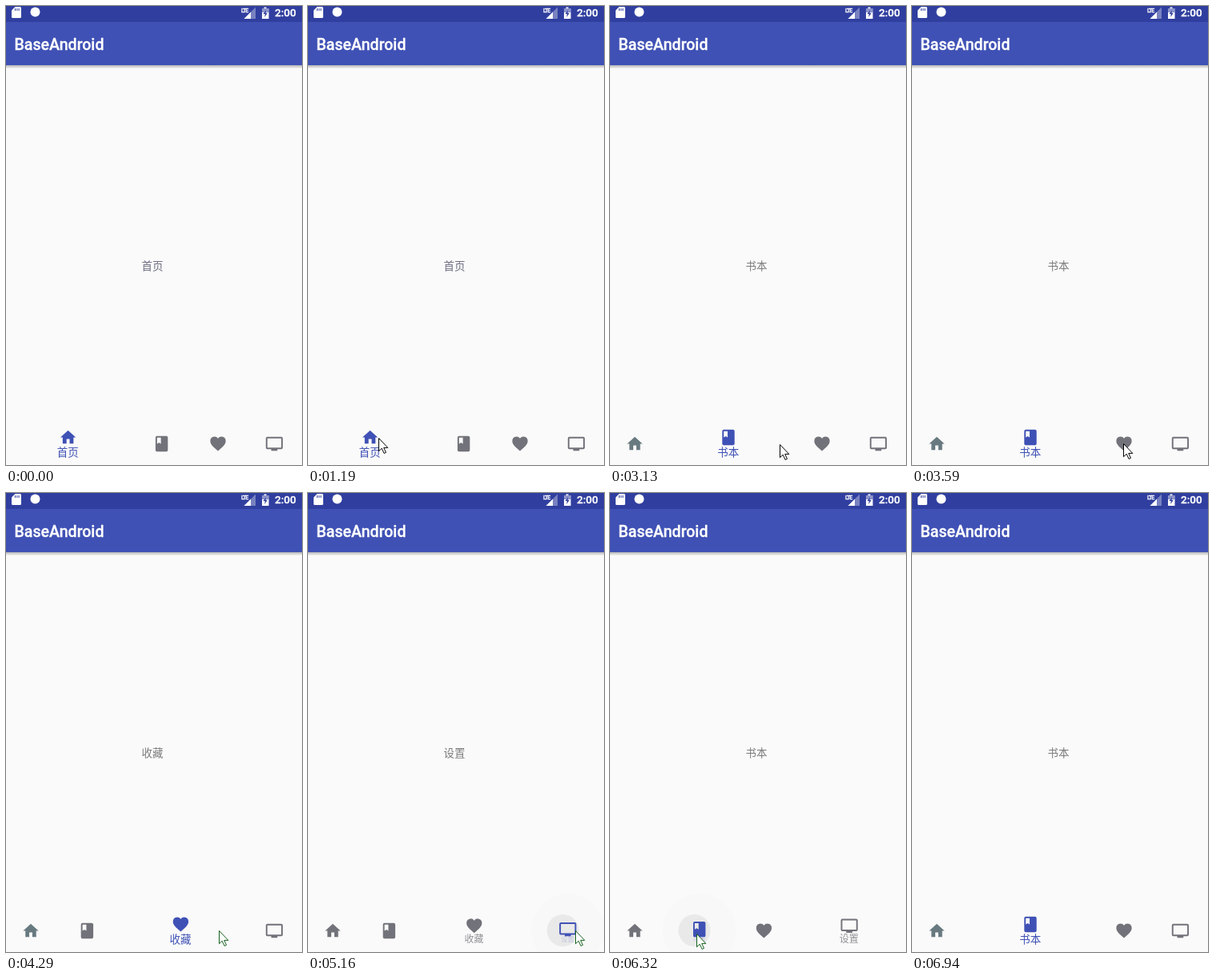
An HTML page that plays this animation: 370x574 px, repeating every 7560 ms.

```html
<!DOCTYPE html>
<html lang="zh-CN">
<head>
<meta charset="utf-8">
<title>BaseAndroid</title>
<style>
  html, body { margin: 0; width: 100%; height: 100%; overflow: hidden; background: #fafafa; }
  svg { display: block; }
  .cjk { font: 13.5px "Noto Sans CJK SC", "Noto Sans CJK", sans-serif; text-anchor: middle; }
  .bar { font: 500 13.5px Roboto, sans-serif; fill: #fff; stroke: #fff; stroke-width: .3px; }
  .bar.title { font-size: 19.6px; }
  .bar.tiny { font-size: 7px; letter-spacing: -1px; }
</style>
</head>
<body>
<svg width="370" height="574" viewBox="0 0 370 574">
  <defs>
    <linearGradient id="shade" x2="0" y2="1">
      <stop stop-opacity=".28"/>
      <stop offset="1" stop-opacity="0"/>
    </linearGradient>
  </defs>
  <rect width="370" height="574" fill="#fafafa"/>
  <rect y="74" width="370" height="4.5" fill="url(#shade)"/>
  <rect y="20" width="370" height="54" fill="#3f51b5"/>
  <rect width="370" height="20" fill="#303f9f"/>

  <!-- status bar -->
  <g fill="#fff">
    <path d="M11.500 1H17.500a1.500 1.500 0 0 1 1.500 1.500V13.500a1.500 1.500 0 0 1-1.500 1.500h-9a1.500 1.500 0 0 1-1.500-1.500v-8z"/>
    <path d="M11.500 3v3m2.300-3v3m2.300-3v3" stroke="#303f9f"/>
    <circle cx="36.500" cy="7.500" r="6"/>
    <path d="M312 1.500V16H297.500z" opacity=".35"/>
    <path d="M306 7.500V16h-8.500z"/>
    <path d="M322.500 3V1.500h3V3h3v13h-8.500V3z"/>
    <path d="M320 3h8.500v5H320z" fill="#303f9f" opacity=".55"/>
    <path d="M325 5l-3.500 5h2.300l-.6 4 3.600-5.200h-2.300z" fill="#303f9f"/>
  </g>
  <text class="bar tiny" x="294" y="7.500">LTE</text>
  <text class="bar" x="336" y="13">2:00</text>
  <text class="bar title" x="10.500" y="54.600">BaseAndroid</text>

  <text id="page" class="cjk" x="183" y="330"></text>
  <circle id="halo" r="46" cy="547"/>
  <circle id="ripple" r="20" cy="547"/>
  <g id="nav"></g>
  <path id="cursor" d="M.5.5v16.200l3.700-3.500 2.900 6.200 2.400-1.100-2.800-5.900h5.100z" fill="#fff" stroke-linejoin="round"/>
</svg>
<script>
const LOOP = 7560, STEP = 700 / 9, PHASE = 17;  // the picture refreshes once per STEP
const ACTIVE = '#3f51b5', IDLE = '#72727a', RESTED = '#687a80';
const SHOWN = 630, GONE = 6930;                 // cursor on stage
const ITEMS = [
  ['首页', 'M10 20v-6h4v6h5v-8h3L12 3 2 12h3v8z'],
  ['书本', 'M6 2h12a2 2 0 0 1 2 2v16a2 2 0 0 1-2 2H6a2 2 0 0 1-2-2V4a2 2 0 0 1 2-2zM6 4v8l2.5-1.5L11 12V4z'],
  ['收藏', 'M12 21.350C5.400 15.360 2 12.280 2 8.500A5.500 5.500 0 0 1 12 5.100 5.500 5.500 0 0 1 22 8.500C22 12.280 18.600 15.360 12 21.350z'],
  ['设置', 'M3 3h18a2 2 0 0 1 2 2v12a2 2 0 0 1-2 2h-5v2H8v-2H3a2 2 0 0 1-2-2V5a2 2 0 0 1 2-2zM3 5v12h18V5z']
];
const TAPS = [
  { at: -LOOP, tab: 0 }, { at: 2245, tab: 1 }, { at: 3956, tab: 2 }, { at: 5122, tab: 3 }, { at: 6289, tab: 1 }
];
// cursor moves: start, end, x, y
const ENTRY = [245, 497];
const MOVES = [
  [640, 1180, 88, 540], [1180, 1340, 165, 554], [1420, 1740, 187, 548],
  [2850, 3590, 266, 547], [4390, 4610, 334, 547],
  [5230, 5460, 169, 549], [5460, 5770, 108, 551], [6700, 6940, 168, 574]
];

const $ = id => document.getElementById(id);
const set = (el, attrs) => { for (const k in attrs) el.setAttribute(k, attrs[k]); };
const mix = (a, b, p) => a + (b - a) * p;
const clamp = x => Math.min(1, Math.max(0, x));
const smooth = x => x * x * (3 - 2 * x);

$('nav').innerHTML = ITEMS.map(([label, d]) =>
  `<g><path d="${d}" fill-rule="evenodd"/><text class="cjk" y="5">${label}</text></g>`).join('');
const tabs = [...$('nav').children];

// cubic-bezier(.4, 0, .2, 1)
function ease(x) {
  if (x >= 1) return 1;
  let lo = 0, hi = 1;
  for (let i = 0; i < 20; i++) {
    const s = (lo + hi) / 2, r = 1 - s;
    if (1.2 * r * r * s + 0.6 * r * s * s + s ** 3 < x) lo = s; else hi = s;
  }
  return smooth(lo);
}

// centre of tab i while tab sel is the wide one
const slot = (i, sel) => 31 + 70.4 * i + 46.6 * (1 + Math.sign(i - sel));

const cursorAt = t => MOVES.reduce(([x, y], [from, to, x2, y2]) => {
  const p = smooth(clamp((t - from) / (to - from)));
  return [mix(x, x2, p), mix(y, y2, p)];
}, ENTRY);

function draw(time) {
  const t = Math.floor((time - PHASE) / STEP) * STEP + PHASE;
  const n = TAPS.filter(tap => tap.at <= t).length - 1;
  const { at, tab: sel } = TAPS[n], prev = TAPS[Math.max(0, n - 1)].tab;
  const age = t - at, p = ease(age / 115);
  const place = i => mix(slot(i, prev), slot(i, sel), p);

  $('page').textContent = ITEMS[sel][0];
  set($('page'), { fill: n ? '#7b7b7b' : '#6d6d82' });

  tabs.forEach((tab, i) => {
    const on = mix(i === prev, i === sel, p), x = place(i);
    const [icon, label] = tab.children;
    const idle = i === 0 && p === 1 ? RESTED : IDLE;
    set(tab, { fill: i === sel ? ACTIVE : idle });
    set(icon, { transform: `translate(${x} ${547.5 - 8 * on}) scale(.9635) translate(-12 -12)` });
    set(label, { transform: `translate(${x - 0.3} 558) scale(${0.5 + on / 2})`, opacity: on });
  });

  const fade = clamp(1 - (age - 28) / 230), cx = place(sel);
  set($('halo'), { cx, opacity: 0.006 * fade });
  set($('ripple'), { cx: cx - 8 * (1 - p), opacity: 0.058 * fade });

  const [x, y] = cursorAt(t);
  set($('cursor'), {
    transform: `translate(${Math.round(x)} ${Math.round(y)})`,
    stroke: n < 2 ? '#000' : '#14601c',
    visibility: t >= SHOWN && t < GONE ? 'visible' : 'hidden'
  });
}

const start = performance.now();
function frame() {
  draw((performance.now() - start) % LOOP);
  requestAnimationFrame(frame);
}
frame();
</script>
</body>
</html>
```
